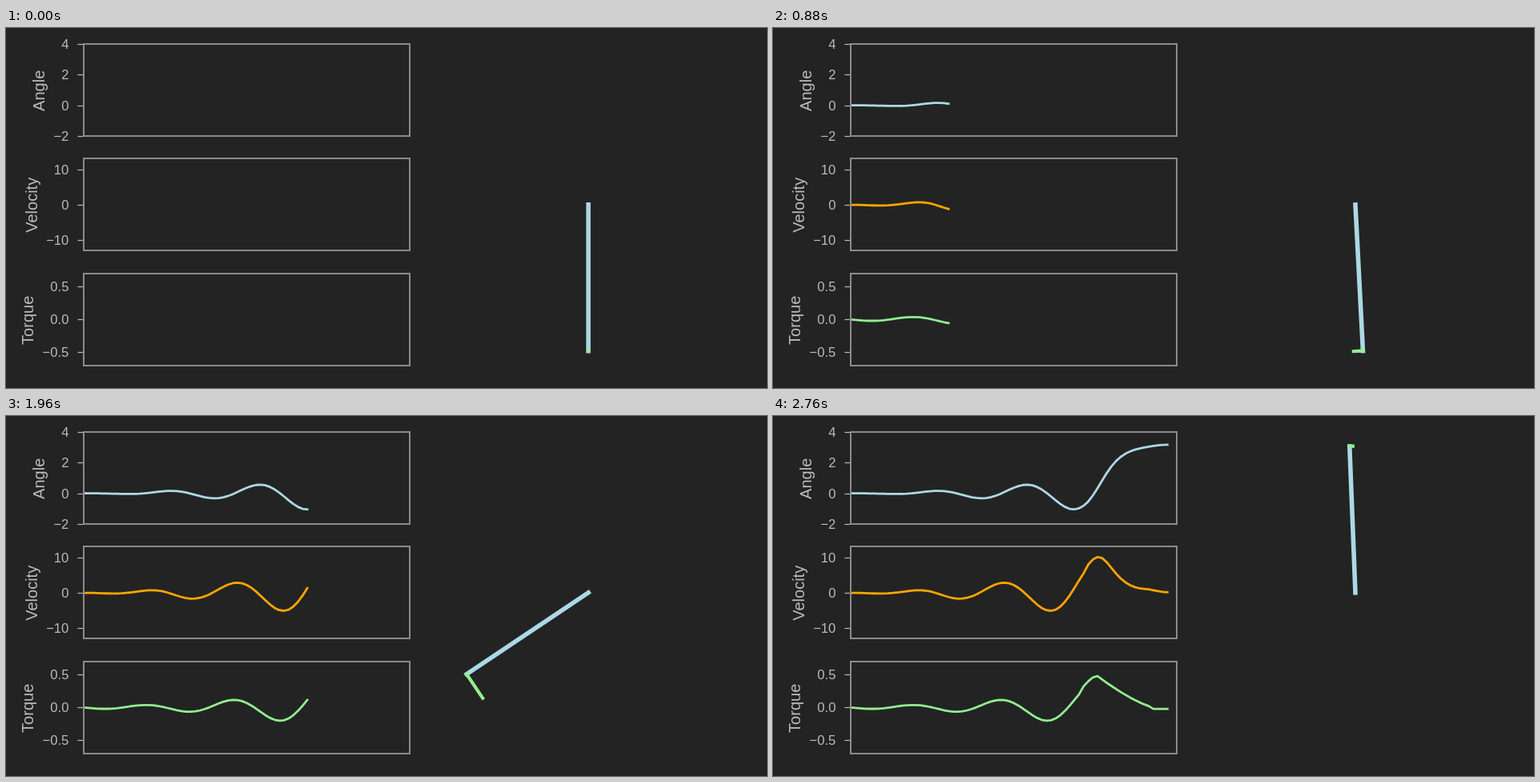
An HTML page for the animation above (2.8 s loop, 950 by 450 pixels).

```html
<!DOCTYPE html>
<html lang="en">
<head>
<meta charset="utf-8">
<title>Pendulum swing-up</title>
<style>
  html, body { margin: 0; width: 100%; height: 100%; overflow: hidden; background: #232323; }
  svg { display: block; width: 950px; height: 450px; }
  text { font-family: "Liberation Sans", Arial, sans-serif; fill: #bbb; }
  .tick { font-size: 16.67px; text-anchor: end; }
  .label { font-size: 20px; text-anchor: middle; }
  .curve { fill: none; stroke-width: 2.78; stroke-linecap: square; stroke-linejoin: round; }
  .frame { fill: none; stroke: #8b8b8b; stroke-width: 2; }
  .mark { stroke: #bbb; stroke-width: 1.2; }
  .rod { stroke: #add8e6; stroke-width: 5.56; stroke-linecap: square; }
  .force { stroke: #90ee90; stroke-width: 4.17; stroke-linecap: square; }
</style>
</head>
<body>
<svg id="stage" viewBox="0 0 950 450"></svg>
<script>
const STEPS = 70, STEP_MS = 40, DT = 0.05;
const LEFT = 97, RIGHT = 504, HEIGHT = 115;
const DX = (RIGHT - LEFT) / STEPS;
const PIVOT = { x: 727, y: 220.8 }, ARM = 183;
const stage = document.getElementById('stage');

function add(tag, attrs, parent = stage) {
  const node = document.createElementNS('http://www.w3.org/2000/svg', tag);
  for (const key in attrs) node.setAttribute(key, attrs[key]);
  parent.appendChild(node);
  return node;
}

// Growing swings, each a little slower than the last.
function pump(s) {
  const swing = (Math.sqrt(73.76 + 0.64 * s) - 8.78) / 0.32;
  return -0.5366 * Math.exp(0.565 * swing) * Math.cos(Math.PI * swing + 0.178);
}

// The last pass through the bottom, up to the balance point.
const rise = s => 10.15 / Math.cosh((s - 53.2) / 3.05);
const settle = s => 0.4 * Math.exp(-(((s - 64) / 2.2) ** 2));

function velocityAt(s) {
  return s < 51 ? pump(s) * Math.min(1, s / 18) : rise(s) + settle(s);
}

function torqueAt(s) {
  if (s < 50) return 0.04 * pump(s + 0.7);
  if (s <= 53) return 0.047 * rise(s + 0.3);
  if (s < 65) return 0.477 * (1 - (s - 53) / 12.2) ** 1.35;
  return -0.022;
}

const sample = fn => Array.from({ length: STEPS }, (_, s) => fn(s));
const velocity = sample(velocityAt);
const torque = sample(torqueAt);
const angle = [0];
for (let s = 1; s < STEPS; s++) angle[s] = angle[s - 1] + DT * velocity[s - 1];

const charts = [
  { name: 'Angle', top: 20, zero: 96.7, unit: 19.17, color: '#add8e6', data: angle,
    ticks: ['4', '2', '0', '−2'], labelX: 48 },
  { name: 'Velocity', top: 163, zero: 221.1, unit: 4.43, color: '#ffa500', data: velocity,
    ticks: ['10', '0', '−10'], labelX: 39 },
  { name: 'Torque', top: 307, zero: 364.3, unit: 82.2, color: '#90ee90', data: torque,
    ticks: ['0.5', '0.0', '−0.5'], labelX: 34 }
];

const defs = add('defs', {});
charts.forEach((chart, i) => {
  const box = { x: LEFT, y: chart.top, width: RIGHT - LEFT, height: HEIGHT };
  const toY = value => chart.zero - value * chart.unit;
  add('rect', box, add('clipPath', { id: 'clip' + i }, defs));
  chart.points = chart.data.map((v, s) => `${(LEFT + s * DX).toFixed(2)},${toY(v).toFixed(2)}`);
  chart.line = add('polyline', { class: 'curve', stroke: chart.color },
    add('g', { 'clip-path': `url(#clip${i})` }));
  for (const tick of chart.ticks) {
    const y = Math.round(toY(Number(tick.replace('−', '-'))));
    add('line', { class: 'mark', x1: 89.5, x2: 96, y1: y + 0.5, y2: y + 0.5 });
    add('text', { class: 'tick', x: 78.4, y: y + 6 }).textContent = tick;
  }
  add('rect', { class: 'frame', ...box });
  const midY = chart.top + HEIGHT / 2 + 0.8;
  add('text', { class: 'label', transform: `translate(${chart.labelX} ${midY}) rotate(-90)` })
    .textContent = chart.name;
});

const rod = add('line', { class: 'rod', x1: PIVOT.x, y1: PIVOT.y });
const force = add('line', { class: 'force' });

function setLine(line, values) {
  for (const key in values) line.setAttribute(key, values[key].toFixed(2));
}

function draw(step) {
  for (const { line, points } of charts)
    line.setAttribute('points', step > 1 ? points.slice(0, step).join(' ') : '');
  const sin = Math.sin(angle[step]), cos = Math.cos(angle[step]);
  const x = PIVOT.x + ARM * sin, y = PIVOT.y + ARM * cos;
  const push = ARM * torque[step];
  setLine(rod, { x2: x, y2: y });
  setLine(force, { x1: x, y1: y, x2: x + push * cos, y2: y - push * sin });
}

const start = performance.now();
function tick() {
  const time = Math.max(0, performance.now() - start);
  draw(Math.floor(time / STEP_MS) % STEPS);
  requestAnimationFrame(tick);
}
tick();
</script>
</body>
</html>
```
